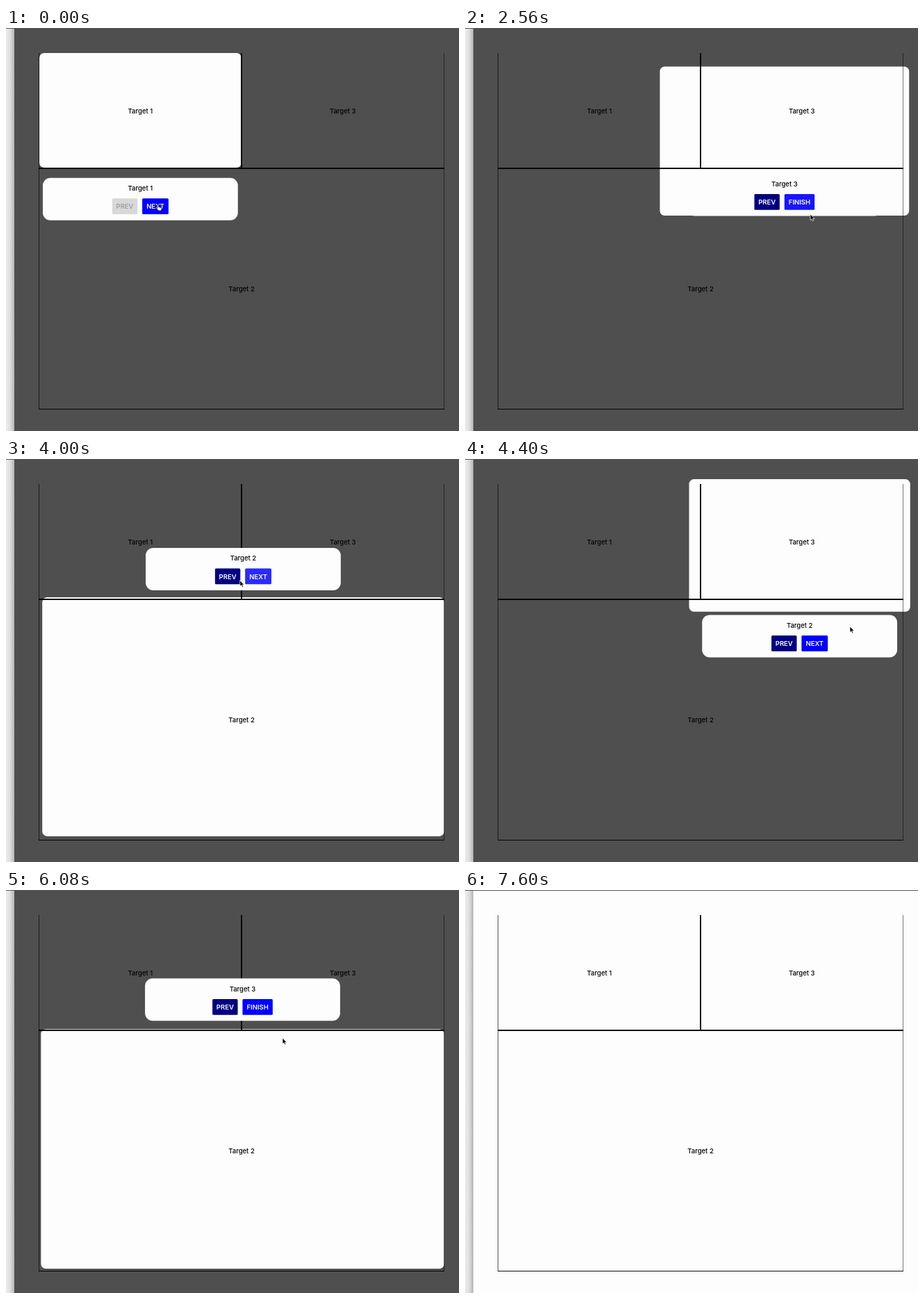
An HTML page that plays this animation: 652x580 px, repeating every 7.68 s.

```html
<!DOCTYPE html>
<html lang="en">
<head>
<meta charset="utf-8">
<title>Guided tour</title>
<style>
  html, body { margin: 0; width: 100%; height: 100%; overflow: hidden; background: #fdfdfd; }
  svg { display: block; width: 652px; height: 580px; }
  text { font: 500 9.5px Inter, "Liberation Sans", sans-serif; text-anchor: middle; }
  .button { font-weight: 600; fill: #fff; }
</style>
</head>
<body>
<svg viewBox="0 0 652 580">
  <defs>
    <linearGradient id="edge">
      <stop offset="0" stop-color="#ececec"/>
      <stop offset=".5" stop-color="#dedede"/>
      <stop offset="1" stop-color="#b4b4b4"/>
    </linearGradient>
  </defs>
  <rect width="652" height="580" fill="#fdfdfd"/>
  <rect width="12" height="580" fill="url(#edge)"/>
  <rect x="47" y="36" width="1" height="513" fill="#555"/>
  <rect x="630" y="36" width="1" height="513" fill="#777"/>
  <rect x="338" y="36" width="2" height="166" fill="#111"/>
  <rect x="47" y="201" width="584" height="2" fill="#111"/>
  <rect x="47" y="548" width="584" height="1" fill="#111"/>
  <text x="193.4" y="122.6">Target 1</text>
  <text x="484.7" y="122.6">Target 3</text>
  <text x="339" y="379.4">Target 2</text>

  <g id="tour">
    <path id="mask" fill-rule="evenodd" fill-opacity=".688"/>
    <g id="popover">
      <rect x="-140.4" width="280.8" height="61" rx="11" fill="#fdfdfd"/>
      <text id="label" y="18.3"></text>
      <rect id="prev" y="29.6" width="36.4" height="22.8" rx="1.5"/>
      <text id="prevText" class="button" y="44.6">PREV</text>
      <rect id="next" y="29.6" height="22.8" rx="1.5"/>
      <text id="nextText" class="button" y="44.6"></text>
    </g>
  </g>
  <rect width="652" height="1" fill="#555"/>

  <g id="cursor" stroke-linejoin="round">
    <path id="arrow" d="M0 0V8.6L2 6.8 3.3 9.8 4.8 9.2 3.5 6.3H6Z" stroke="#fff" stroke-width=".7"/>
    <path id="hand" d="M-1 .6Q0-.6 .9 .6V3.6L4.6 4.4Q5.4 4.7 5.2 6L4.4 9H.4L-2.6 5.6Q-2.4 4.2-1 5.2Z" fill="#fff" stroke="#000" stroke-width=".8"/>
  </g>
</svg>
<script>
const LOOP = 7680, TICK = 80, MOVE = 500, GAP = 14.7, POPOVER = 61;
const $ = id => document.getElementById(id);
const set = (id, attrs) => { for (const k in attrs) $(id).setAttribute(k, attrs[k]); };
const clamp = v => Math.max(0, Math.min(1, v));
const mix = (a, b, p) => a.map((v, i) => v + (b[i] - v) * p);

// Spotlight edges with padding, then the top of the popover below or above it.
function stop(l, t, r, b, pad = 0, above = false) {
  const top = above ? t - GAP - POPOVER : b + pad + GAP;
  return [l - pad, t - pad, r + pad, b + pad, top];
}
const stops = [
  stop(48, 36, 338.7, 201),
  stop(340, 36, 630, 201, 11),
  stop(47.5, 202, 630.5, 548.5, 0, true)
];
const clicks = [
  { at: -MOVE, step: 0 }, { at: 773, step: 1 }, { at: 2416, step: 2 },
  { at: 3954, step: 1 }, { at: 5616, step: 2 }
];

// Cursor legs; between legs it rests on a button as a hand.
const legs = [
  { at: -1, ms: 1, x: 219, y: 254 },
  { at: 800, ms: 240, x: 218, y: 254 },
  { at: 1040, ms: 400, x: 530, y: 140 },
  { at: 1440, ms: 720, x: 497, y: 268 },
  { at: 2560, ms: 320, x: 306, y: 254 },
  { at: 2880, ms: 420, x: 315, y: 168 },
  { at: 3960, ms: 440, x: 554, y: 241 },
  { at: 4400, ms: 720, x: 506, y: 267 },
  { at: 5640, ms: 440, x: 398, y: 213 },
  { at: 6080, ms: 80, x: 363, y: 168 },
  { at: 6400, ms: 700, x: 670, y: 95 }
];

// cubic-bezier(.42, 0, .58, 1)
function ease(x) {
  let lo = 0, hi = 1, s;
  for (let i = 0; i < 24; i++) {
    s = (lo + hi) / 2;
    const bx = 1.26 * s * (1 - s) ** 2 + 1.74 * s * s * (1 - s) + s ** 3;
    if (bx < x) lo = s; else hi = s;
  }
  return s * s * (3 - 2 * s);
}

function hole([l, t, r, b], q = 7) {
  const c = (x, y) => `A${q} ${q} 0 0 1 ${x} ${y}`;
  return `M${l + q} ${t}H${r - q}${c(r, t + q)}V${b - q}${c(r - q, b)}` +
    `H${l + q}${c(l, b - q)}V${t + q}${c(l + q, t)}Z`;
}

function drawTour(t) {
  const n = clicks.findLastIndex(c => c.at <= t);
  const { at, step } = clicks[n];
  const from = stops[clicks[Math.max(n - 1, 0)].step];
  const box = mix(from, stops[step], ease(clamp((t - at) / MOVE)));
  set('mask', { d: 'M12 1H652V580H12Z' + hole(box) });
  set('popover', { transform: `translate(${(box[0] + box[2]) / 2} ${box[4]})` });

  const last = step === 2, width = last ? 43.4 : 37.8;
  const left = -(36.4 + 6.9 + width) / 2, right = left + 43.3;
  const glow = Math.round(51 * (1 - clamp((t - at) / 250)));
  $('label').textContent = 'Target ' + (step + 1);
  $('nextText').textContent = last ? 'FINISH' : 'NEXT';
  set('prev', { x: left, fill: step ? '#000080' : '#d8d8d8' });
  set('prevText', { x: left + 18.2, style: step ? '' : 'fill:#a0a0a0' });
  set('next', { x: right, width, fill: `rgb(${glow},${glow},255)` });
  set('nextText', { x: right + width / 2 });
  set('tour', { opacity: 1 - ease(clamp((t - 6600) / 760)) });
}

function drawCursor(t) {
  const i = legs.findLastIndex(leg => leg.at <= t);
  const leg = legs[i], from = legs[i - 1] || leg;
  const p = clamp((t - leg.at) / leg.ms);
  const [x, y] = mix([from.x, from.y], [leg.x, leg.y], p);
  set('cursor', { transform: `translate(${x} ${y})` });
  set('hand', { display: p < 1 ? 'none' : 'inline' });
  set('arrow', { display: p < 1 ? 'inline' : 'none' });
}

let origin;
function frame(now) {
  origin ??= now;
  const t = Math.floor(((now - origin) % LOOP) / TICK) * TICK;
  drawTour(t);
  drawCursor(t);
  requestAnimationFrame(frame);
}
requestAnimationFrame(frame);
</script>
</body>
</html>
```
